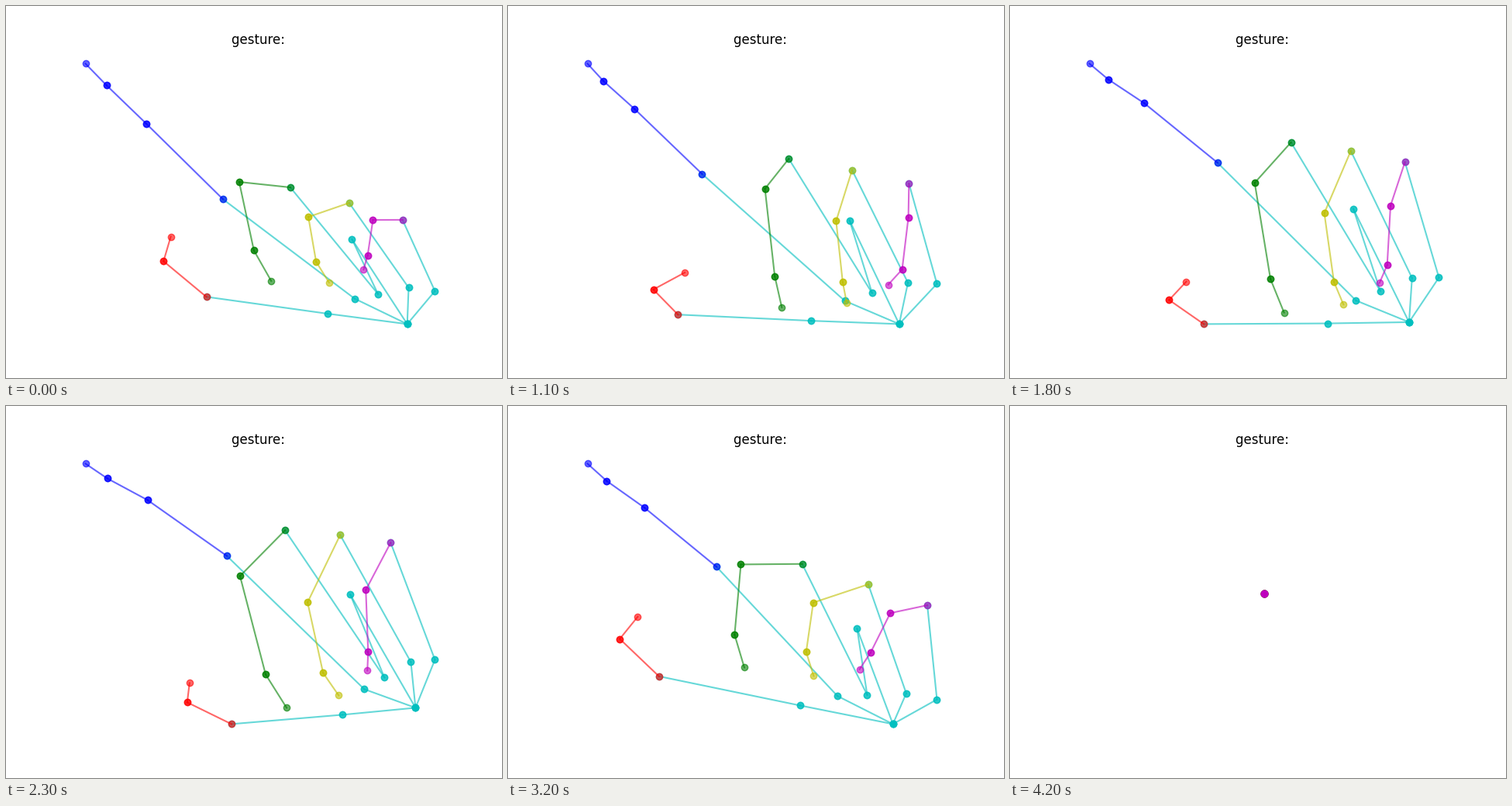
A matplotlib script that plays this animation: 640x480 px, repeating every 9 s.

```python
import numpy as np
import matplotlib.pyplot as plt
from matplotlib.animation import FuncAnimation

STEP = 100        # ms per frame
FRAMES = 90
LOST = 42         # frame at which tracking is lost
ALPHA = 0.6

# How the hand tilts: at each key frame the shear and depth weight along x,
# then the shear, depth and knuckle weights along y.
KEYS = (0, 7, 14, 23, 28, 36)
TILT = np.array([(-0.13, 0.11, 0.28, -0.77, 1.3),
                 (-0.23, 1.21, 0.155, 0, 1.1),
                 (-0.29, 1.07, 0.14, 0, 0),
                 (0, 0, 0, 0, 0),
                 (-0.155, 0.055, 0.24, -0.43, 0),
                 (-0.52, 0.61, 0.75, -1.5, -1.5)])

CURLED = (0, -12, 30, 40, 33)     # depth from palm to tip
POINTING = (0, -22, -14, -5, 0)
KNUCKLE = (0, 30, 15, 4, 0)       # how far a raised knuckle shifts


def limb(points, depth, lift=KNUCKLE):
    """Rows of x, y, depth and knuckle lift, one column per joint."""
    x, y = np.transpose(points)
    return np.array([x, y, depth, lift], float)


wrist = limb([(528, 389)], [0], [0])
palm = limb([(444, 243)], [-8], [17])
thumb = limb([(434, 398), (291, 410), (234, 382), (237, 357)],
             (0, 0, 20, 42), (0, 0, 0, 0))
index = limb([(462, 365), (285, 193), (183, 121), (131, 93), (103, 74)],
             POINTING)
middle = limb([(488, 350), (360, 160), (302, 219), (335, 346), (362, 389)],
              CURLED)
ring = limb([(522, 330), (431, 166), (389, 253), (409, 344), (429, 373)],
            CURLED)
pinky = limb([(553, 327), (496, 176), (464, 237), (467, 317), (466, 341)],
             CURLED)

# Each chain starts at the wrist; its last bones take the finger colour.
chains = [(np.hstack(parts), color, count)
          for parts, color, count in [((wrist, thumb), 'r', 2),
                                      ((wrist, index), 'b', 3),
                                      ((wrist, palm, middle), 'g', 3),
                                      ((wrist, ring), 'y', 3),
                                      ((wrist, pinky), 'm', 3)]]

fig, ax = plt.subplots(figsize=(6.4, 4.8), dpi=100)
ax.set_axis_off()
ax.set_title('gesture: ')
bones = []


def add_bones(joints, color):
    for j in range(joints.shape[1] - 1):
        line, = ax.plot([], [], color + '-o', alpha=ALPHA)
        bones.append((line, joints[:, j:j + 2]))


for joints, color, count in chains:
    add_bones(joints[:, :-count], 'c')
for joints, color, count in chains:
    add_bones(joints[:, -count - 1:], color)


def project(joints, tilt):
    x, y, depth, lift = joints
    shear_x, depth_x, shear_y, depth_y, lift_y = tilt
    x = x - wrist[0]
    y = y - wrist[1]
    return (x + shear_x * y + depth_x * depth,
            y + shear_y * x + depth_y * depth + lift_y * lift)


def draw(frame):
    tilt = [np.interp(frame, KEYS, column) for column in TILT.T]
    for line, joints in bones:
        x, y = project(joints, tilt) if frame < LOST else np.zeros((2, 2))
        line.set_data(x, -y)
    # The view always fits the hand, so its extremes touch the same box.
    ax.relim()
    ax.autoscale_view()
    return [line for line, _ in bones]


anim = FuncAnimation(fig, draw, frames=FRAMES, interval=STEP,
                     init_func=lambda: draw(0), repeat=True, repeat_delay=0)
plt.show()
```
